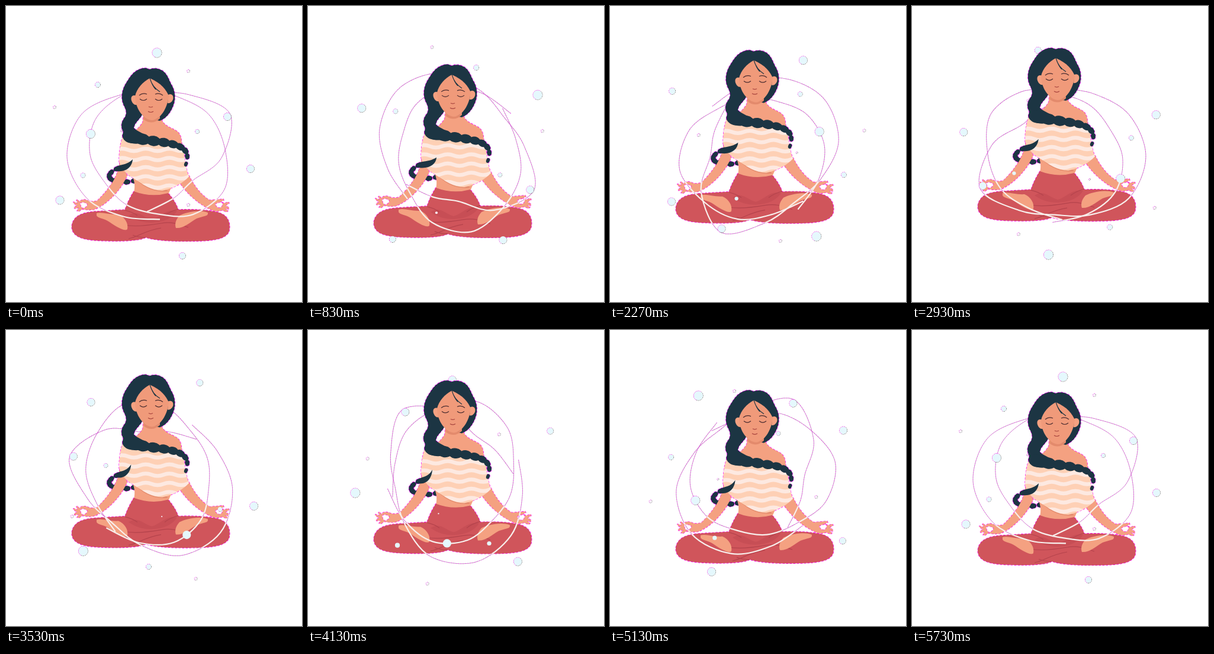
An HTML page with a canvas that plays this animation: 500x500 px, repeating every 5760 ms.

```html
<!DOCTYPE html>
<html lang="en">
<head>
<meta charset="utf-8">
<title>Meditation</title>
<style>
html, body { margin: 0; width: 100%; height: 100%; overflow: hidden; background: #fff; }
canvas { display: block; width: 500px; height: 500px; }
</style>
</head>
<body>
<canvas id="stage" width="500" height="500"></canvas>
<script>
const g = document.getElementById('stage').getContext('2d');
const TAU = Math.PI * 2, RAD = Math.PI / 180;
const LOOP = 5760, STEP = 100 / 3, STEPS = 172;
const CX = 249, CY = 250;
const HAIR = '#1c3543', SKIN = '#f4a181', SHADE = '#e38a6c', FACE = '#f09a7a';
const PANTS = '#d0555b', FOLD = '#b4434c', EDGE = '#f0f';

// Open strands around the stage centre: radii at even angle steps
const strands = [
  strand(84.3, 372, [111, 117, 135, 146, 139, 115, 103, 117, 146, 115, 80, 82, 98]),
  strand(271.5, -368, [116, 112, 114, 107, 95, 97, 101, 122, 134, 121, 115, 105, 111])
];

// Orbiting bubbles at the start of the loop: x, y, radius
const bubbles = [
  [255, 79, 8], [143, 216, 7.5], [91, 328, 7], [374, 187, 6.5], [413, 275, 6.5], [298, 422, 5.5], [155, 133, 4.5],
  [130, 286, 4], [323, 212, 3.5], [308, 110, 2.5], [82, 171, 2.5], [308, 336, 2.5], [195, 211, 1.5]
];

function strand(from, sweep, radii) {
  const last = radii.length - 1, path = new Path2D();
  const at = i => {
    i = Math.max(0, Math.min(last, i));
    const a = (from + sweep * i / last) * RAD;
    return [radii[i] * Math.cos(a), radii[i] * Math.sin(a)];
  };
  path.moveTo(...at(0));
  for (let i = 0; i < last; i++) {
    const [a, b, c, d] = [at(i - 1), at(i), at(i + 1), at(i + 2)];
    path.bezierCurveTo(b[0] + (c[0] - a[0]) / 6, b[1] + (c[1] - a[1]) / 6,
      c[0] - (d[0] - b[0]) / 6, c[1] - (d[1] - b[1]) / 6, ...c);
  }
  return path;
}

// Shrinking beads along a cubic curve, each turned along it
function beads(a, b, c, d, count, size, endSize) {
  const path = new Path2D();
  for (let i = 0; i < count; i++) {
    const t = i / (count - 1), u = 1 - t;
    const [x, y] = [0, 1].map(k => u * u * u * a[k] + 3 * u * u * t * b[k] + 3 * u * t * t * c[k] + t * t * t * d[k]);
    const [dx, dy] = [0, 1].map(k => u * u * (b[k] - a[k]) + 2 * u * t * (c[k] - b[k]) + t * t * (d[k] - c[k]));
    const r = size + (endSize - size) * t, turn = Math.atan2(dy, dx);
    path.moveTo(x + 1.4 * r * Math.cos(turn), y + 1.4 * r * Math.sin(turn));
    path.ellipse(x, y, 1.4 * r, r, turn, 0, TAU);
  }
  return path;
}

const P = d => new Path2D(d);
const fill = (path, color) => { g.fillStyle = color; g.fill(path); };
const line = (path, color, width) => {
  g.strokeStyle = color; g.lineWidth = width; g.stroke(path);
};

const hair = P('M228 106Q236 103 242 107Q253 103 262 108C272 113 274 122 279 132C287 144 287 160 281 172C276 183 269 190 260 194L240 190L232 179C229 190 217 196 216 206C222 213 234 214 239 223C236 232 222 234 213 232C202 230 196 221 198 212C193 204 195 195 200 189C205 182 203 175 199 168C193 155 196 141 203 130C209 121 214 110 228 106Z');
const face = P('M243 122C231 128 221 139 218 152C218 174 233 192 246 193C260 192 272 175 275 152C271 142 262 130 243 122Z');
const ears = P('M220 152C214 149 210 153 212 160Q215 168 221 167ZM274 150C280 147 284 152 282 158Q279 165 273 164Z');
const features = P('M226 157Q232 162 238 157M252 157Q258 162 264 157M225 151Q231 146 238 149M252 149Q259 146 265 151');
const noseMouth = P('M241 170Q244.5 172 248 170M240 178Q244.5 181 249 178');
const wisps = P('M243 122C246 133 252 140 260 145M243 122C247 134 250 138 253 141');
const neck = P('M232 182L231 196Q222 212 205 216L215 240L297 240C297 226 296 216 288 211C277 204 264 203 260 184Z');
const neckShade = P('M232 184Q246 199 260 186L260 190Q247 202 233 192Z');
const blouse = P('M200 214C193 228 191 245 191 263C196 276 204 285 214 290C232 302 246 312 264 312C284 308 300 298 309 288C303 272 301 254 300 238L240 226Z');
const waist = P('M213 286C218 298 218 306 216 315Q246 326 275 316L283 298Z');
const waistShade = P('M214 288C230 305 250 316 274 313L264 305Z');
const armL = P('M192 264C190 284 178 306 154 329C145 331 141 330 137 328C132 326 126 327 124 331L121 327L119 328L121 333L114 331L114 333L120 337L115 340L116 342L123 341L120 346L123 347L129 343C138 345 145 345 151 343C170 335 194 312 205 286Z');
const armR = P('M309 286C317 303 330 320 344 328L367 326L368 328L362 331L369 333L376 331L377 333L371 337L377 341L376 343L370 342L375 346L373 348L365 345C358 348 350 347 344 343C325 334 304 316 292 296Z');
const holes = [P('M125 333Q131 329 138 335Q136 341 130 342Q126 340 125 333Z'), P('M353 335Q359 330 366 332Q367 339 361 341Q356 341 353 335Z')];
const pants = P('M216 313Q245 324 274 316C282 325 288 335 291 344C315 343 340 344 356 348C375 352 380 366 377 380C373 392 356 396 330 397C300 398 258 398 236 391C224 398 180 398 150 396C124 394 111 387 111 372C113 356 126 349 150 347L201 344C204 335 210 322 216 313Z');
const lap = P('M207 354C224 343 232 358 246 361C260 358 270 342 289 346C282 358 267 365 246 366C232 366 220 363 207 354Z');
const folds = P('M178 364C205 375 232 372 262 367C284 363 297 371 308 374M207 393C224 390 232 380 262 375M201 345Q214 348 222 354M291 343Q277 347 268 354M236 391Q224 391 214 387');
const footL = P('M153 350C162 347 175 353 190 352C201 357 207 367 205 377C201 382 185 372 175 365C165 358 155 359 153 354Z');
const footR = P('M341 349C325 343 303 349 293 354C286 362 285 369 287 375C300 376 310 366 322 359C332 355 341 355 341 351Z');
const braid = beads([211, 221], [262, 234], [318, 226], [304, 267], 9, 10.5, 3);
const braidLoop = beads([217, 295], [186, 303], [157, 290], [187, 275], 8, 4.5, 4);

let stripes = '';
for (let y = 243; y < 310; y += 15.5) stripes += `M186 ${y}q10 -4 20 0t20 0t20 0t20 0t20 0t20 0t20 0`;
stripes = P(stripes);

function drawFigure(sway) {
  const x = 214 + 4 * sway, y = 259 + 3.5 * sway;
  const tip = P(`M182 276C189 265 201 272 ${x} ${y}C${x - 1} ${y + 13} 202 283 182 278Z`);

  fill(braidLoop, HAIR);
  fill(waist, SKIN);
  fill(waistShade, SHADE);
  fill(pants, PANTS);
  fill(lap, '#c74e55');
  line(folds, FOLD, 1.2);
  [footL, footR, armL, armR].forEach(p => fill(p, SKIN));
  g.globalCompositeOperation = 'destination-out';
  holes.forEach(h => fill(h, '#000'));
  g.globalCompositeOperation = 'source-over';
  fill(neck, SKIN);
  fill(blouse, '#fed0b5');
  g.save();
  g.clip(blouse);
  line(stripes, '#fde9e1', 6.5);
  g.restore();
  fill(hair, HAIR);
  fill(neckShade, SHADE);
  fill(ears, SKIN);
  fill(face, FACE);
  line(wisps, HAIR, 1.2);
  line(features, '#4b2d30', 1.2);
  line(noseMouth, '#a8453f', 1.2);
  fill(braid, HAIR);
  fill(tip, HAIR);

  // Thin coloured rim, kept outside the silhouette
  g.globalCompositeOperation = 'destination-over';
  g.setLineDash([4, 2]);
  [hair, blouse, neck, armL, armR, pants, braid, braidLoop, tip, ...holes].forEach(p => line(p, EDGE, 1.3));
  g.setLineDash([]);
}

function drawStrands(turn, color, width) {
  g.save();
  g.translate(CX, CY);
  g.rotate(turn);
  strands.forEach(s => line(s, color, width));
  g.restore();
}

function drawBubble([bx, by, r], turn) {
  const c = Math.cos(turn), s = Math.sin(turn), dx = bx - CX, dy = by - CY;
  const x = CX + dx * c - dy * s, y = CY + dx * s + dy * c;
  const arc = (from, to, radius) => {
    const p = new Path2D();
    p.arc(x, y, radius, from, to);
    return p;
  };
  g.globalCompositeOperation = y > CY ? 'source-over' : 'destination-over';
  fill(arc(0, TAU, r - .4), r > 3 ? '#e5f8fd' : '#f8f0fa');
  g.globalCompositeOperation = 'destination-over';
  g.setLineDash([2, 1]);
  line(arc(-.9, 2, r), '#777', 1);
  line(arc(2, TAU - .9, r), '#e44ee4', 1);
}

function render(time) {
  const step = Math.min(STEPS, Math.floor((time % LOOP + 4) / STEP));
  const turn = step / STEPS * TAU;
  g.globalCompositeOperation = 'source-over';
  g.clearRect(0, 0, 500, 500);

  g.save();
  g.translate(0, -34 * Math.abs(Math.sin(turn / 2)) ** 2.1);
  drawFigure(Math.sin(turn));
  g.restore();

  // Strands cross in front of the figure only in the lower half
  g.save();
  g.beginPath();
  g.rect(0, CY, 500, 250);
  g.clip();
  g.globalCompositeOperation = 'source-atop';
  drawStrands(turn, '#f8efec', 2.2);
  g.restore();

  bubbles.forEach(b => drawBubble(b, turn));

  // Dotted in two colours everywhere else
  g.setLineDash([2, 2]);
  drawStrands(turn, '#e03ce0', 1);
  g.lineDashOffset = 2;
  drawStrands(turn, '#b9a9b4', 1);
  g.lineDashOffset = 0;
  g.setLineDash([]);
}

const start = performance.now();
(function tick() {
  render(performance.now() - start);
  requestAnimationFrame(tick);
})();
</script>
</body>
</html>
```
